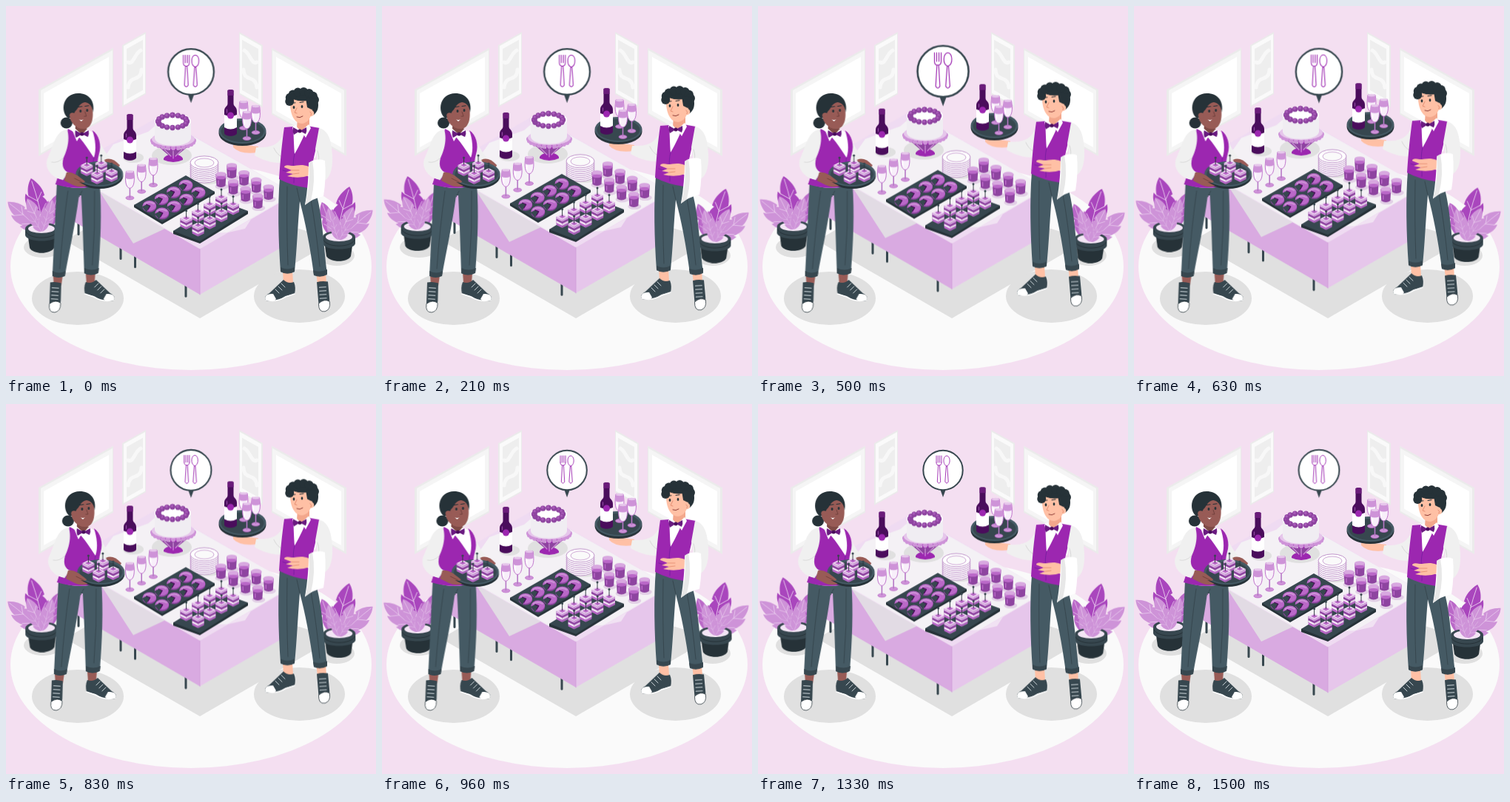
Recreate the animation shown at these times as an HTML page. Size 500x500 px, loop 1.54 s.

```html
<!DOCTYPE html>
<html lang="en">
<head>
<meta charset="utf-8">
<title>Catering</title>
<style>
html, body { margin: 0; width: 100%; height: 100%; overflow: hidden; background: #f4dff1; }
svg { display: block; width: 100vw; height: 100vh; }
</style>
</head>
<body>
<svg id="stage" viewBox="0 0 500 500"></svg>
<script>
const PURPLE = '#9c27b0', DEEP = '#7b1fa2', WINE = '#4a0d5c', PLUM = '#8e44a0', MID = '#ba68c8', LIGHT = '#ce93d8', PALE = '#e6c6eb';
const INK = '#263238', SLATE = '#37474f', CLOTH = '#455a64', GREY = '#e0e0e0', SHIRT = '#f0f0f0', WHITE = '#fafafa';
const BROWN = '#985b56', PEACH = '#ffc0a5';

const path = (d, fill, more = '') => `<path d="${d}" fill="${fill}" ${more}/>`;
const line = (d, color, w = 1) => path(d, 'none', `stroke="${color}" stroke-width="${w}" stroke-linecap="round" stroke-linejoin="round"`);
const oval = (x, y, rx, ry, fill, more = '') => `<ellipse cx="${x}" cy="${y}" rx="${rx}" ry="${ry}" fill="${fill}" ${more}/>`;
const dot = (x, y, r, fill) => oval(x, y, r, r, fill);
const group = (body, attr = '') => `<g ${attr}>${body}</g>`;
const at = (x, y, body, more = '') => group(body, `transform="translate(${x} ${y}) ${more}"`);
const times = (n, fn) => Array.from({ length: n }, (_, i) => fn(i));
const repeat = (n, fn) => times(n, fn).join('');

// Places copies of an item along two slanted directions
const grid = (item, [x, y], rows, cols, [rx, ry], [cx, cy]) =>
  repeat(rows, r => repeat(cols, c => item(x + r * rx + c * cx, y + r * ry + c * cy)));

// Points along part of an ellipse, angles in degrees
const ring = (n, x, y, rx, ry, from, to, fn) => repeat(n, i => {
  const a = (from + (to - from) * i / (n - 1)) * Math.PI / 180;
  return fn(x + rx * Math.cos(a), y + ry * Math.sin(a));
});

// Upright panel on the left wall
const panel = (x, y, w, h, fill) => path(`M${x} ${y}l${w} ${-w * .56}v${h}l${-w} ${w * .56}z`, fill);

function wallFrames() {
  return panel(44, 113, 101, 90, '#ebebeb') + panel(47, 114, 97, 85, '#f5f5f5') + panel(51, 118, 88, 73, '#fff') +
    panel(157, 53, 32, 84, '#ebebeb') + panel(159, 54, 29, 80, WHITE) + panel(163, 58, 22, 68, '#eee') +
    line('M165 110C167 92 182 104 183 86M165 76C172 80 174 64 182 60', '#f8f8f8', 5);
}

function leaf(x, y, angle, size, fill) {
  return at(x, y,
    path('M0 0C-10-6-16-18-16-30L-12-28C-16-40-15-46-12-52L-9-47C-9-57-5-65 0-70C8-62 12-52 12-44L9-43C15-36 15-28 13-20C11-12 7-5 0 0Z', fill) +
    line('M0 0Q3-34 0-66M1-18-11-30M2-22 11-33M2-38-9-48M2-40 9-49', '#ecd3f0', .8),
    `rotate(${angle}) scale(${size / 70})`);
}

function plant() {
  return leaf(51, 302, -14, 71, '#a946bd') + leaf(51, 304, 22, 54, MID) +
    leaf(47, 305, -48, 60, LIGHT) + leaf(49, 306, -24, 50, LIGHT) + leaf(50, 306, 16, 46, LIGHT) +
    path('M29 306 32 327C36 336 60 336 65 327L68 306Z', INK) +
    path('M26 301C26 290 70 290 70 301V310C68 320 28 320 26 310Z', SLATE) +
    oval(48, 301, 18, 6, '#f3e5f5') + leaf(48, 305, -34, 28, LIGHT) + leaf(49, 305, 16, 30, LIGHT) +
    line('M27 305C31 316 65 316 69 305', INK);
}

// Tableware
function bottle(x, y) {
  return at(x, y, path('M-4 1Q0-1 4 1V19C4 23 8.500 23 8.500 29V59C7 64-7 64-8.500 59V29C-8.500 23-4 23-4 19Z', WINE) +
    path('M-4 1Q0-1 4 1V8H-4Z', '#6a1b7a') + path('M-8.500 34Q0 38 8.500 34V51Q0 56-8.500 51Z', '#fff') +
    dot(0, 35, 4.500, PURPLE) + line('M-5 27V31', PLUM, 1.3));
}

function flute(x, y) {
  return at(x, y, oval(0, 37, 5.500, 2.500, LIGHT, `stroke="${MID}" stroke-width=".7"`) + line('M0 23V36', '#b678c6', 1.6) +
    path('M-5 1C-7 13-6 23 0 24C6 23 7 13 5 1Z', '#f8effa', `stroke="${MID}" stroke-width=".9"`) +
    path('M-5 1-6 10Q0 13 6 10L5 1Z', LIGHT) + oval(0, 1.500, 5, 1.700, PALE) + line('M-3 13V18', '#fff', 1.3));
}

function cup(x, y) {
  return at(x, y, oval(1, 19, 9, 4, '#e2cfe6') + path('M-7 2-6 18Q0 22 6 18L7 2Z', PLUM) +
    path('M-7 2-6.700 7Q0 10 6.700 7L7 2Z', LIGHT) + oval(0, 2, 7, 2.800, '#d8a8e0') +
    oval(0, 7, 6.300, 2.300, MID) + line('M-3.500 11V16', MID, 1.5));
}

function cube(x, y) {
  const side = (sx, tint) => ['#dcb0e4', PLUM, '#f3e5f5', MID].map((c, i) =>
    path(`M${sx * 8} ${i * 2.700}l${-sx * 8} 4v3l${sx * 8}-4Z`, c, `opacity="${tint}"`)).join('');
  return at(x, y - 5, path('M-8 0V9L0 13 8 9V0L0 4Z', PLUM) + side(-1, 1) + side(1, .85) +
    path('M-8 0 0-4 8 0 0 4Z', '#eed5f2') + path('M-4.500 0 0-2.200 4.500 0 0 2.200Z', MID) +
    line('M0-1V-10', INK, .9) + dot(0, -10, 1.5, SLATE));
}

function donut(x, y) {
  return at(x, y, oval(0, 1, 9.500, 7.500, PLUM) + oval(0, -.3, 9.300, 7, MID) +
    line('M-6-3Q0-7 6-3', LIGHT, 2) + path('M1 0-4-2-10 1-4 8Z', SLATE) + line('M-4-2 1 0-2 5', WINE, 1.2));
}

const roundTray = (x, y) => oval(x, y + 3, 32, 17, INK) + oval(x, y, 32, 17, CLOTH) + oval(x, y + .5, 29, 14.500, SLATE);

function cake() {
  return oval(224, 202, 27, 13, GREY) +
    path('M223 190H230L232 201Q240 204 239 208Q226 214 213 208Q212 204 220 201Z', PURPLE) +
    path('M206 190Q226 200 246 190L231 202H220Z', PLUM) +
    line('M214 194 223 203M226 196V206M238 194 229 203', LIGHT, 1.2) +
    oval(226, 182, 30, 11, MID) + ring(13, 226, 182, 28, 10, 0, 180, (x, y) => dot(x, y, 3, LIGHT)) + oval(226, 180, 29, 10, PALE) +
    path('M201 156V179C203 192 248 192 250 179V156Z', '#f0edf2') + oval(225.500, 156, 24.500, 11.500, '#fff') +
    ring(17, 225, 156, 19.500, 8.500, -90, 270, (x, y) => dot(x, y, 3.700, PLUM) + dot(x - .7, y - 1, 1.8, '#a95bb9'));
}

const plates = () => repeat(8, i => oval(268, 230 - i * 2.600, 19, 9, '#fff', 'stroke="#c094ca" stroke-width="1"')) +
  oval(268, 212, 13, 6, WHITE, 'stroke="#cfa9d6" stroke-width="1"');

function table() {
  return [98, 155, 174.500, 243].map(x => line(`M${x} ${228 + x * .577}v24`, SLATE, 3)).join('') +
    path('M79 223 207 149 390 254 262 328Z', '#efdbf2') +
    path('M79 223 262 328V390L79 284Z', '#d9aae1') +
    path('M262 328 390 254V316L262 390Z', PALE) +
    path('M126 250 172 321 236 291 228 308Z', '#e2dbe4') +
    path('M108 240 145 187 192 170 212 153 376 246 372 264 301 306 229 309Z', '#f4f1f5') +
    path('M301 306 323 301 332 287Z', '#f1e2f3') +
    line('M262 328V390', '#d09cd9', .8) + line('M128 251 262 328 372 264', '#efdcf2', .8) +
    oval(172, 205, 14, 7, GREY) + bottle(167.500, 146) + cake() + oval(273, 232, 21, 9, GREY) + plates() +
    grid(flute, [199, 205], 1, 3, [0, 0], [-15.800, 8.700]) +
    grid(cup, [305, 213], 2, 4, [-14.500, 12], [16.600, 9.700]) +
    path('M173 269V272L211 295 282 254V251L243 240Z', INK) + path('M173 269 243 229 282 251 211 292Z', SLATE) +
    grid(donut, [243, 242], 2, 4, [17, 9.700], [-16.400, 9.400]) +
    path('M226 304V308L262 321 327 281V277L290 290Z', INK) + path('M226 304 291 264 327 277 262 318Z', SLATE) +
    grid(cube, [291, 263], 2, 4, [16, 9.500], [-15.800, 9.600]);
}

// People
const bow = (x, y) => at(x, y, path('M0 0-9-5Q-10 1-8 5ZL9-5Q10 0 8 4Z', '#6a1b80') + dot(0, 0, 2.500, WINE));
const eyes = (x, y, gap) => repeat(2, i => at(x + gap * i, y - i, oval(0, 0, 1.4, 1.9, INK) + line('M-3-5.500 2-6.200', INK, 1.1)));

// Sneaker seen from the front, toe pointing down
const frontShoe = (x, y, lean) => at(x, y,
  path('M-7 0Q0-2 8 0L9 24Q9 38 2 40Q-6 40-6 32Z', SLATE) +
  path('M-6 29Q2 22 9 27Q10 38 2 40Q-7 41-6 29Z', '#fff', `stroke="${INK}" stroke-width=".7"`) +
  repeat(4, i => line(`M-4 ${7 + i * 5}h9`, '#cfd8dc')), `rotate(${lean})`);

// Sneaker in profile, toe pointing right
const sideShoe = (x, y, flip) => at(x, y,
  path('M0 2Q8 5 14-1L33 17Q41 21 38 27Q24 30 11 21L-1 18Q-3 9 0 2Z', SLATE) +
  path('M28 18Q38 17 39 24Q37 29 26 27L24 25Z', '#fff') + line('M-1 18 11 22Q24 30 38 26', '#fff', 1.6) +
  repeat(3, i => line(`M${12 + i * 4} ${9 + i * 4}l5-5`, '#cfd8dc')), flip);

function woman() {
  return path('M64 364H77L75 378H65Z', BROWN) + path('M108 360H121L120 375H109Z', BROWN) +
    frontShoe(67, 374, 4) + sideShoe(108, 371, '') +
    path('M69 240Q98 252 127 240C130 280 128 320 125 360Q116 366 106 361L104 300 102 256H99C94 295 86 330 80 364Q71 369 63 364C65 325 67 280 69 240Z', CLOTH) +
    path('M63 358Q72 363 81 358L80 365Q71 369 63 365Z', SLATE) + path('M106 354Q116 359 126 354L125 361Q115 366 106 361Z', SLATE) +
    line('M99 258 103 250M84 250Q77 300 73 355M120 250Q121 300 117 350', SLATE) +
    path('M118 174C128 180 130 194 140 204L136 214 120 207Z', SHIRT) +
    path('M80 168Q100 160 120 172L126 200 110 220 84 205Z', '#fff') +
    path('M84 166C95 170 105 183 119 205C123 194 121 180 117 168C126 174 130 188 126 200C122 215 124 230 124 242Q96 250 67 241C75 220 77 190 84 166Z', PURPLE) +
    line('M119 205C116 220 118 232 117 244M80 224 95 228', DEEP) +
    path('M94 157 109 161 110 172Q101 176 94 169Z', '#7f4a46') +
    path('M93 165 102 173 96 183 90 168ZM109 167 104 173 112 181 115 171Z', '#fff') + bow(103, 173) +
    oval(82, 158, 8, 7.500, INK) +
    path('M86 140C88 122 116 122 117 138C119 150 117 165 106 166C95 167 87 157 86 148Z', BROWN) +
    path('M85 152C73 144 76 118 98 118C112 118 121 128 118 144C117 135 113 131 107 130C99 131 98 139 94 142L90 149Z', INK) +
    dot(90, 148, 3.800, BROWN) + eyes(101, 142, 9) + line('M107 143 109 149 106 149', '#70403c') + path('M99 153Q102 155 105 153L102 156Z', '#fff') +
    path('M133 208Q143 203 154 215L152 220 139 217Z', BROWN) + roundTray(126.500, 227) +
    grid(cube, [129, 217], 2, 2, [14, 11], [-19.500, 3]) +
    path('M83 167C67 168 65 188 56 207C52 220 62 232 77 235L84 225C76 220 76 213 78 205C83 195 87 180 83 167Z', SHIRT) +
    line('M78 205Q70 213 62 211M77 235 84 225', '#dcdcdc') +
    path('M82 225C91 224 97 229 107 237Q107 240 99 238L109 243Q100 246 91 242L79 236Z', BROWN) + line('M93 233 103 238', '#70403c', .9);
}

function man() {
  return path('M374 358H387L388 374H375Z', PEACH) + path('M419 360H432L433 376H421Z', PEACH) +
    frontShoe(427, 373, -3) + sideShoe(389, 371, 'scale(-1 1)') +
    path('M370 232Q390 242 412 236C427 262 428 315 434 362Q425 368 416 363C411 325 404 290 397 264C394 300 393 330 390 359Q380 364 371 359C368 315 367 270 370 232Z', CLOTH) +
    path('M371 353Q380 358 390 353V359Q380 364 371 359Z', SLATE) + path('M415 357Q424 361 434 356V363Q425 368 416 364Z', SLATE) +
    line('M397 264 393 246M380 244Q379 300 381 350M412 262Q419 300 424 352', SLATE) +
    path('M341 190 316 187Q306 184 307 191Q316 201 340 198Z', PEACH) +
    path('M378 166C371 186 362 192 338 191L336 202C350 210 366 214 374 211Z', SHIRT) + line('M362 192Q366 201 373 204', '#d8d8d8') +
    roundTray(319.500, 169) + bottle(303.500, 113) +
    flute(321, 128) + flute(337.500, 134) + flute(325.500, 142) +
    path('M378 164Q400 158 423 165L418 205H382Z', '#fff') +
    path('M376 164 388 163C389 178 389 190 390 200C397 188 404 174 407 162L424 165C421 190 412 215 408 246Q386 243 369 234C371 205 373 185 376 164Z', PURPLE) +
    line('M390 200C386 215 390 230 389 239M374 222 384 225', DEEP) +
    path('M394 151H410V165Q400 171 393 165Z', '#f3a78c') +
    path('M391 161 398 169 390 177 387 164ZM409 160 399 169 405 178 412 165Z', '#fff') + bow(397, 169) +
    oval(410, 134, 12, 15, INK) +
    path('M384 127C391 116 409 118 413 132C416 145 410 158 400 159C389 159 383 145 384 127Z', PEACH) +
    oval(401, 121, 17, 7.500, INK) + ring(9, 400, 127, 17, 11, 170, 385, (x, y) => dot(x, y, 6, INK)) +
    path('M405 124 407 137 413 140 421 136V126Z', INK) + dot(412, 145, 4.300, PEACH) +
    eyes(389, 137, 11) + line('M393 138 390 144 393 145M411 143Q414 145 412 148', '#e58e72') + line('M393 150Q397 152 401 149', '#8d3b36') +
    path('M423 165C437 168 440 185 441 202C442 222 437 237 424 238L406 229 409 217 422 214 418 193Z', SHIRT) +
    line('M422 214Q424 204 421 196', '#d8d8d8') +
    path('M409 217C399 213 394 216 386 216Q376 214 376 218L386 222 378 225 388 227 380 230Q396 234 410 229Z', PEACH) +
    line('M386 222 396 222M388 227 396 226', '#e58e72', .9) +
    path('M409 212Q420 205 431 209Q433 232 429 257Q415 260 404 269Q409 240 409 212Z', '#fff') +
    path('M409 212Q412 240 404 269L412 263Q419 235 414 209Z', '#e8e8e8');
}

function bubble() {
  const tines = [241, 243.300, 245.700, 248].map(x => `M${x} 70v9`).join('');
  return path('M245 112 250 126 255 112Z', SLATE) +
    `<circle cx="250" cy="89.500" r="26.700" fill="#fff" stroke="${SLATE}" stroke-width="2"/>` +
    line(tines + 'M241 79Q241 83 244.500 83Q248 83 248 79M243.600 83 242.300 105Q244.500 109 246.700 105L245.400 83', PURPLE, .9) +
    line('M255 84C249 82 250 70 255 70C260 70 261 82 255 84M254.300 84 252.800 105Q255 109 257.200 105L255.700 84', PURPLE, .9);
}

const mirror = (width, body, dy = 0) => at(width, dy, body, 'scale(-1 1)');

stage.innerHTML =
  oval(250, 352, 244, 140, WHITE) + wallFrames() + mirror(504, wallFrames()) +
  path('M262 422 80 317 207 243 445 316Z', GREY) +
  oval(97, 395, 62, 36, GREY) + oval(396.500, 392, 61.500, 36, GREY) +
  oval(50, 326, 26, 14, GREY) + oval(447, 337, 24, 14, GREY) +
  group(plant() + mirror(498, plant(), 11), 'id="plants"') +
  group(table() + man(), 'id="float"') +
  group(woman(), 'id="shake"') +
  group(bubble(), 'id="beat"');

// Motion: all parts share one loop and one phase
function move(id, steps, css, easing, origin = '0 0') {
  const el = document.getElementById(id);
  el.style.transformOrigin = origin;
  el.animate(steps.map(([offset, v]) => ({ offset, transform: css(v), easing })),
    { duration: 1540, iterations: Infinity, delay: -50 });
}

// Alternating swings that double up to 4 px and die away again
const swings = times(11, i => {
  const k = Math.min(i, 10 - i);
  return [i / 10, k ? (-1) ** i * Math.min(4, 2 ** (k - 1)) : 0];
});

move('float', [[0, 0], [.5, -9], [1, 0]], v => `translateY(${v}px)`, 'ease-in-out');
move('plants', [[0, 0], [.25, 1], [.75, -1], [1, 0]], v => `rotate(${v}deg)`, 'ease-in-out', '250px 280px');
move('shake', swings, v => `translateX(${v}px)`, 'linear');
move('beat', [[0, 1], [.14, 1.3], [.28, 1], [.38, 1.3], [.7, 1], [1, 1]], v => `scale(${v})`,
  'cubic-bezier(.12, .1, .2, 1)', '250px 93.5px');
</script>
</body>
</html>
```
